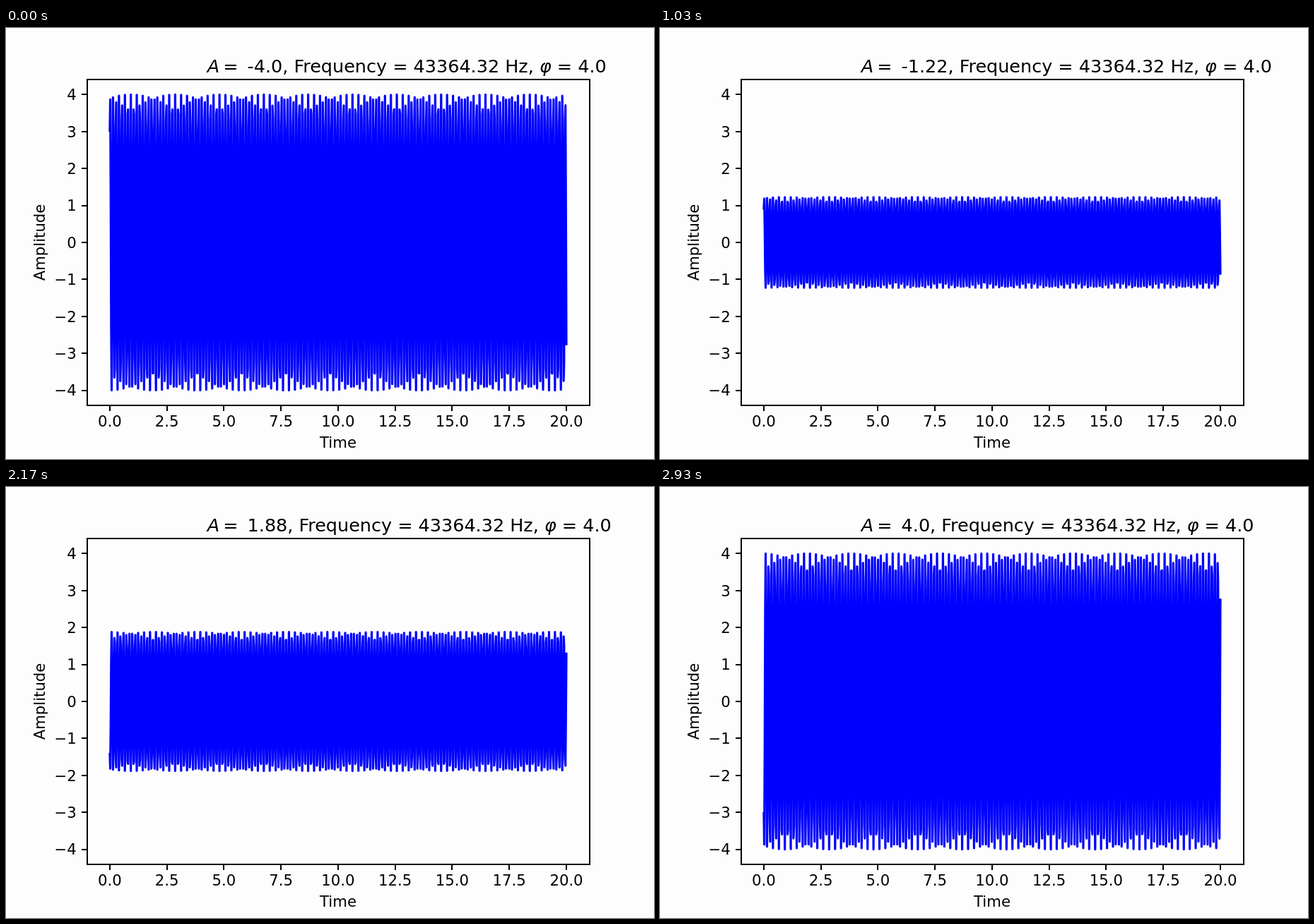
These frames come from a looping animation (917 px wide and 611 px high, 3.01 s). An HTML page with a canvas:

```html
<!DOCTYPE html>
<html lang="en">
<head>
<meta charset="utf-8">
<title>Sine wave amplitude sweep</title>
<style>
  html, body { margin: 0; width: 100%; height: 100%; overflow: hidden; background: #fdfdfd; }
  canvas { display: block; }
</style>
</head>
<body>
<canvas id="plot" width="917" height="611"></canvas>
<script>
const ctx = document.getElementById('plot').getContext('2d');
const LOOP = 3010, STEPS = 50, SAMPLES = 1000;
const CYCLES = 154.484, PHASE = 4; // aliased cycles across the time span
const BLACK = '#000', BLUE = '#00f', PAPER = '#fdfdfd';
const LABEL = 21.22, TITLE = 25.47;

// [step, start in ms]; starts in between are evenly spaced
const KNOTS = [[0, 0], [1, 70], [9, 530], [10, 600], [12, 730], [13, 770], [18, 1070],
  [19, 1130], [22, 1330], [23, 1370], [27, 1630], [28, 1670], [30, 1800], [31, 1870],
  [36, 2170], [37, 2230], [44, 2630], [45, 2700], [46, 2770], [49, 2930], [50, LOOP]];

const starts = [];
KNOTS.slice(1).forEach(([b, tb], k) => {
  const [a, ta] = KNOTS[k];
  for (let i = a; i < b; i++)
    starts[i] = Math.round((ta + (tb - ta) * (i - a) / (b - a)) / 10) * 10;
});

const px = t => 146.9 + 32.305 * t;
const py = v => 304 - 52.42 * v;

function text(s, x, y, size, align = 'left', style = '') {
  ctx.font = `${style} ${size}px "DejaVu Sans", sans-serif`;
  ctx.textAlign = align;
  ctx.fillText(s, x, y);
  return x + ctx.measureText(s).width;
}

function line(x1, y1, x2, y2) {
  ctx.beginPath();
  ctx.moveTo(x1, y1);
  ctx.lineTo(x2, y2);
  ctx.stroke();
}

function drawAxes() {
  ctx.fillStyle = ctx.strokeStyle = BLACK;
  ctx.lineWidth = 2;
  ctx.lineCap = 'butt';
  ctx.lineJoin = 'miter';
  ctx.strokeRect(115, 73, 711, 462);
  for (let t = 0; t <= 20; t += 2.5) {
    const x = Math.round(px(t));
    line(x, 535, x, 543);
    text(t.toFixed(1), px(t), 565, LABEL, 'center');
  }
  for (let v = -4; v <= 4; v++) {
    const y = Math.round(py(v));
    line(107, y, 115, y);
    text(String(v).replace('-', '\u2212'), 99.7, py(v) + 7.8, LABEL, 'right');
  }
  text('Time', 470, 594.5, LABEL, 'center');
  ctx.save();
  ctx.translate(55, 304);
  ctx.rotate(-Math.PI / 2);
  text('Amplitude', 0, 0, LABEL, 'center');
  ctx.restore();
}

function drawTitle(amp) {
  const gap = 4.97, y = 63;
  let value = String(Math.round(amp * 100) / 100);
  if (!value.includes('.')) value += '.0';
  let x = text('A', 284.8, y, TITLE, 'left', 'italic');
  x = text('=', x + gap, y, TITLE);
  x = text(` ${value}, Frequency = 43364.32 Hz, `, x + gap, y, TITLE);
  x = text('φ', x, y, TITLE, 'left', 'italic');
  text(' = 4.0', x, y, TITLE);
}

function drawWave(amp) {
  ctx.strokeStyle = BLUE;
  ctx.lineWidth = 3.18;
  ctx.lineCap = 'square';
  ctx.lineJoin = 'round';
  ctx.beginPath();
  for (let i = 0; i < SAMPLES; i++) {
    const u = i / (SAMPLES - 1);
    ctx.lineTo(px(20 * u), py(amp * Math.sin(2 * Math.PI * CYCLES * u + PHASE)));
  }
  ctx.stroke();
}

let shown = -1;
function draw(step) {
  if (step === shown) return;
  shown = step;
  const amp = -4 + 8 * step / (STEPS - 1);
  ctx.fillStyle = PAPER;
  ctx.fillRect(0, 0, 917, 611);
  drawAxes();
  drawTitle(amp);
  drawWave(amp);
}

const origin = performance.now();
function tick() {
  const t = (performance.now() - origin) % LOOP;
  draw(starts.filter(s => s <= t).length - 1);
  requestAnimationFrame(tick);
}
tick();
</script>
</body>
</html>
```
